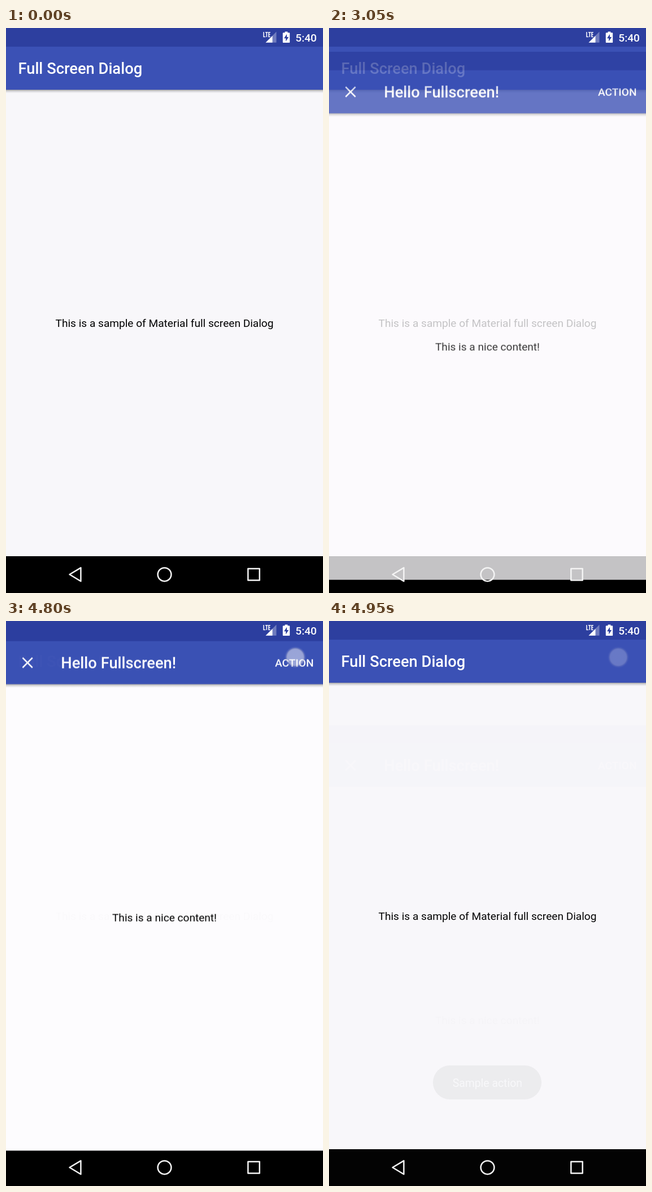
Write an HTML page with a canvas that moves like this. It is 561 px wide and 998 px high and loops after 5 s.

```html
<!DOCTYPE html>
<html lang="en">
<head>
<meta charset="utf-8">
<title>Full Screen Dialog</title>
<style>
  html, body { margin: 0; width: 100%; height: 100%; overflow: hidden; background: #000; }
  canvas { display: block; }
</style>
</head>
<body>
<canvas id="stage" width="561" height="998"></canvas>
<script>
const W = 561, H = 998, LOOP = 5000, STEP = 50;
const BAR = 33, TOOLBAR = 109, NAV = 933, SLIDE = 186;
const DARK = '#2d3f9f', BLUE = '#3b51b5';
const BODY = '400 19.1px Roboto, sans-serif';
const LABEL = '500 19.1px Roboto, sans-serif';
const TITLE = '500 27.3px Roboto, sans-serif';

const screen = document.getElementById('stage').getContext('2d');
const sheet = document.createElement('canvas');
sheet.width = W;
sheet.height = H;
const dialog = sheet.getContext('2d');

const clamp = v => Math.max(0, Math.min(1, v));

function box(c, color, x, y, w, h) {
  c.fillStyle = color;
  c.fillRect(x, y, w, h);
}

function text(c, str, x, y, font, color, align = 'left') {
  c.font = font;
  c.textAlign = align;
  c.fillStyle = color;
  c.fillText(str, x, y);
}

function shape(c, points, close) {
  c.beginPath();
  points.forEach(([x, y], i) => i ? c.lineTo(x, y) : c.moveTo(x, y));
  if (close) c.closePath();
}

function line(c, ...points) {
  shape(c, points);
  c.stroke();
}

function poly(c, color, ...points) {
  shape(c, points, true);
  c.fillStyle = color;
  c.fill();
}

// Window background, status strip, toolbar and its shadow
function drawPage(c, color) {
  box(c, color, 0, 0, W, NAV);
  box(c, DARK, 0, 0, W, BAR);
  box(c, BLUE, 0, BAR, W, TOOLBAR - BAR);
  const g = c.createLinearGradient(0, TOOLBAR, 0, TOOLBAR + 6);
  g.addColorStop(0, 'rgba(0,0,0,.36)');
  g.addColorStop(.35, 'rgba(0,0,0,.16)');
  g.addColorStop(1, 'rgba(0,0,0,0)');
  box(c, g, 0, TOOLBAR, W, 6);
}

function drawDialog(c) {
  c.clearRect(0, 0, W, H);
  drawPage(c, '#fdfcfe');
  c.strokeStyle = '#fff';
  c.lineWidth = 2.6;
  line(c, [29.4, 62.4], [46.8, 79.8]);
  line(c, [46.8, 62.4], [29.4, 79.8]);
  text(c, 'Hello Fullscreen!', 97.3, 81.3, TITLE, '#fff');
  text(c, 'ACTION', 476, 78.2, LABEL, '#fff');
  text(c, 'This is a nice content!', W / 2, 528.2, BODY, '#000', 'center');
}

function drawStatus(c) {
  poly(c, 'rgba(255,255,255,.32)', [478.5, 6.5], [478.5, 25.8], [459.5, 25.8]);
  poly(c, '#fff', [471.5, 13.8], [471.5, 25.8], [459.5, 25.8]);
  box(c, DARK, 454, 6, 14.6, 11);
  c.strokeStyle = '#fff';
  c.lineWidth = 1.5;
  line(c, [456, 7], [456, 15.4], [459.2, 15.4]);
  line(c, [459, 7.7], [463.6, 7.7]);
  line(c, [461.3, 7], [461.3, 16]);
  line(c, [467.8, 7.7], [465, 7.7], [465, 15.4], [467.8, 15.4]);
  line(c, [465, 11.5], [467.5, 11.5]);

  box(c, '#fff', 493.6, 6.4, 4.8, 3);
  c.beginPath();
  c.roundRect(489.8, 8.3, 12.4, 17.8, 1.2);
  c.fill();
  poly(c, DARK, [497, 10.8], [492, 18.2], [495.2, 18.2], [495.2, 23.4], [500.2, 16], [497, 16]);
  text(c, '5:40', 512.3, 24, LABEL, '#fff');
}

function drawNav(c) {
  c.strokeStyle = '#f4f4f4';
  c.lineWidth = 2.5;
  c.lineJoin = 'round';
  shape(c, [[112.5, 965.3], [132.4, 953.4], [132.4, 977.2]], true);
  c.stroke();
  c.beginPath();
  c.arc(280.5, 965.3, 11.9, 0, Math.PI * 2);
  c.stroke();
  c.strokeRect(428.3, 955, 20.4, 20.6);
  c.lineJoin = 'miter';
}

function drawTouch(c, x, y, alpha) {
  if (alpha <= 0) return;
  const g = c.createRadialGradient(x, y, 0, x, y, 19);
  const stops = [
    [0, '250,250,252,.62'], [.7, '248,248,251,.62'], [.77, '215,215,227,.7'],
    [.82, '190,191,212,.6'], [.88, '190,192,216,.26'], [1, '190,192,216,0']
  ];
  stops.forEach(([at, rgba]) => g.addColorStop(at, `rgba(${rgba})`));
  c.globalAlpha = alpha;
  box(c, g, x - 19, y - 19, 38, 38);
  c.globalAlpha = 1;
}

function drawToast(c) {
  c.fillStyle = 'rgba(50,50,50,.06)';
  c.beginPath();
  c.roundRect(184, 785, 192, 60, 30);
  c.fill();
  text(c, 'Sample action', 280.3, 823, '400 19.4px Roboto, sans-serif', '#f8f8fa', 'center');
}

// How far the dialog has risen: decelerates in, accelerates out
function shown(t) {
  const enter = clamp((t - 2942) / 205);
  const leave = clamp((t - 4780) / 171);
  return 1 - (1 - enter) ** 2 - leave ** 2;
}

function touchAlpha(t, start) {
  return t < start ? 0 : clamp(1 - (t - start - 80) * .0028);
}

function sample(time) {
  const t = Math.floor(time / STEP) * STEP;
  for (const [from, to] of [[2550, 2700], [2950, 3050], [4650, 4750]])
    if (t >= from && t < to) return from;
  return t;
}

function draw(time) {
  const t = sample(time), c = screen, p = shown(t);
  box(c, '#000', 0, 0, W, H);
  drawPage(c, '#f8f7fa');
  text(c, 'Full Screen Dialog', 21.5, 81.3, TITLE, '#fff');
  text(c, 'This is a sample of Material full screen Dialog', W / 2, 528.2, BODY, '#000', 'center');
  if (p > 0) {
    drawDialog(dialog);
    c.globalAlpha = p;
    c.drawImage(sheet, 0, (1 - p) * SLIDE);
    c.globalAlpha = 1;
  }
  if (t >= 4950) drawToast(c);
  drawStatus(c);
  drawNav(c);
  drawTouch(c, 198.3, 523.3, t < 3050 ? touchAlpha(t, 2550) : 0);
  drawTouch(c, 512, 64, touchAlpha(t, 4650));
}

const start = performance.now();
function tick() {
  draw((performance.now() - start) % LOOP);
  requestAnimationFrame(tick);
}
tick();
</script>
</body>
</html>
```
